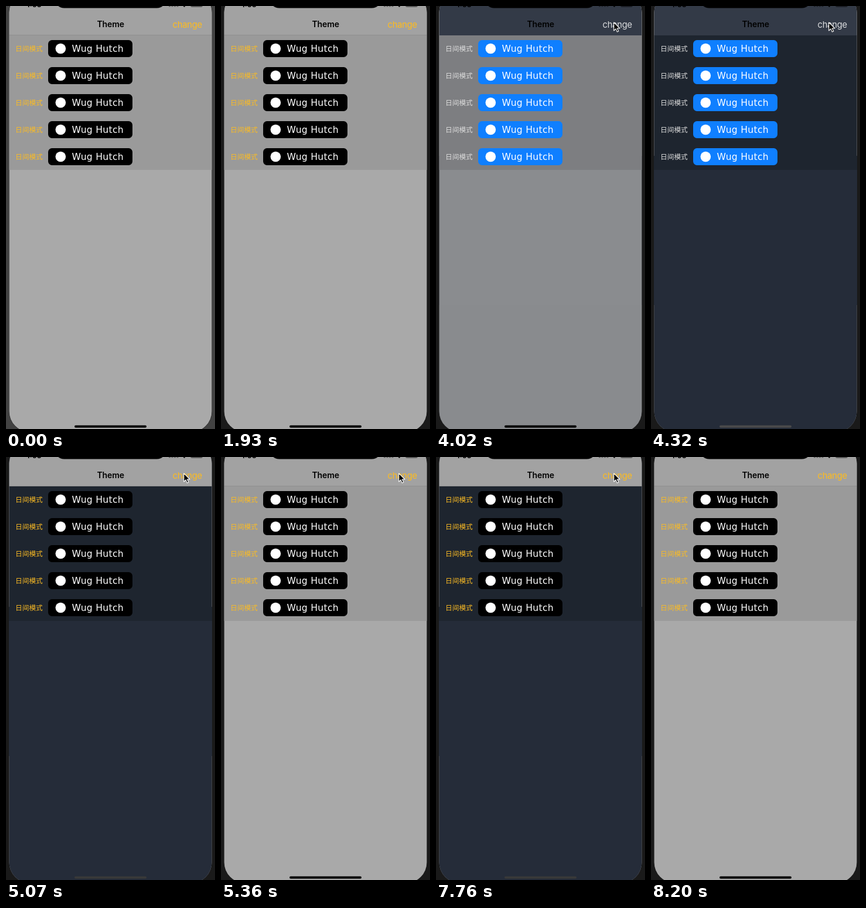
These frames come from a looping animation (357 px wide and 720 px high, 8900 ms). An HTML page:

```html
<!DOCTYPE html>
<html lang="en">
<head>
<meta charset="utf-8">
<title>Theme switch</title>
<style>
  html, body { margin: 0; width: 100%; height: 100%; overflow: hidden; background: #191919; }
  svg { display: block; width: 357px; height: 720px; }
  text { font-family: Inter, sans-serif; }
  .title { font-size: 14px; font-weight: 600; letter-spacing: -.1px; text-anchor: middle; }
  .action { font-size: 14.8px; letter-spacing: -.25px; text-anchor: end; }
  .time { font-size: 13px; font-weight: 600; }
  #labels text { font: 11.7px "Noto Sans CJK SC", "Noto Sans CJK", sans-serif; }
  #names text { font: 15.6px "DejaVu Sans", sans-serif; letter-spacing: .3px; }
</style>
</head>
<body>
<svg viewBox="0 0 357 720">
  <defs>
    <clipPath id="screen"><rect x="5.5" y="-24" width="346" height="749" rx="35"/></clipPath>
  </defs>
  <rect id="bezel" width="357" height="720"/>
  <rect x="5" y="-24.5" width="347" height="750" rx="35.5" fill="#111"/>

  <g clip-path="url(#screen)">
    <rect width="357" height="720" fill="#a9a9a9"/>
    <rect y="50" width="357" height="229" fill="#9a9a9a"/>
    <g id="nightBody">
      <rect width="357" height="720" fill="#252c39"/>
      <rect y="50" width="357" height="229" fill="#1e252f"/>
    </g>
    <rect width="357" height="50" fill="#a2a2a2"/>
    <rect y="49" width="357" height="1" fill="#8e8e8e"/>
    <rect id="nightBar" width="357" height="50" fill="#333a47"/>

    <rect x="82.5" y="-30" width="192" height="33.5" rx="17"/>
    <text class="time" x="35" y="1.5">1:53</text>
    <g fill="#000" fill-opacity=".45">
      <path d="M278 0h3v1.3h-3zm4.5 0h3v1.3h-3zm4.5 0h3v1.3h-3zm4.5 0h3v1.3h-3z"/>
      <rect x="315" y="-8" width="21" height="10" rx="3"/>
    </g>
    <path d="M301.5 -1h6l-3 3z"/>

    <text class="title" x="178.7" y="36">Theme</text>
    <text class="action" id="action" x="335" y="36.5">change</text>

    <g id="labels"></g>
    <g id="buttons"></g>
    <g id="names" fill="#fff"></g>
    <rect id="home" x="117" y="713.7" width="123" height="4" rx="2"/>
  </g>

  <g id="cursor">
    <path d="M.8 .9V15l3.3-3.1 2.3 5.2 2.4-1-2.3-5.1H11z" stroke="#fff" stroke-width="1.1" stroke-linejoin="round"/>
  </g>
</svg>

<script>
const LOOP = 8900;
const byId = id => document.getElementById(id);

function add(parent, tag, attrs, content = '') {
  const node = document.createElementNS('http://www.w3.org/2000/svg', tag);
  for (const key in attrs) node.setAttribute(key, attrs[key]);
  node.textContent = content;
  byId(parent).append(node);
}

for (let row = 0; row < 5; row++) {
  const y = row * 46;
  add('labels', 'text', { x: 16, y: y + 76.6 }, '日间模式');
  add('buttons', 'rect', { x: 72, y: y + 58, width: 144, height: 29, rx: 6.5 });
  add('names', 'circle', { cx: 93.3, cy: y + 72.5, r: 8.8 });
  add('names', 'text', { x: 112.5, y: y + 78.2 }, 'Wug Hutch');
}

// Each step is [start in ms, value]; a value holds until the next step.
function play(id, property, steps) {
  const frames = steps.map(([ms, value]) => ({ offset: ms / LOOP, [property]: value, easing: 'step-end' }));
  frames.push({ offset: 1, [property]: steps.at(-1)[1] });
  byId(id).animate(frames, { duration: LOOP, iterations: Infinity });
}

const themed = (day, night) =>
  [[0, day], [4020, night], [5070, day], [7010, night], [7760, day]];

play('bezel', 'fill', [[0, '#424242'], [1930, '#1a1a1a']]);
play('nightBar', 'opacity', themed(0, 1));
play('action', 'fill', themed('#ffbc1c', '#dcdddf'));
play('labels', 'fill', themed('#fabb24', '#dcdcdc'));
play('buttons', 'fill', themed('#000', '#0f7fff'));

play('nightBody', 'opacity', [
  [0, 0], [4020, .235], [4170, 1], [5210, .4], [5360, 0],
  [7010, .33], [7160, 1], [7910, .1], [8060, 0]
]);

play('home', 'fill', [
  [0, '#000'], [4170, '#2b2b2b'], [4320, '#4a4a4b'], [5070, '#393939'], [5210, '#000'],
  [7160, '#2b2b2b'], [7310, '#4a4a4b'], [7760, '#393939'], [7910, '#000']
]);

const hidden = [-50, -50];
const cursorPath = [
  [0, hidden], [150, [351, 117]], [290, [351, 124]], [440, [333, 124]],
  [740, [319, 123]], [890, [308, 87]], [1030, [309, 80]], [1180, [313, 3]],
  [1330, hidden], [3430, [305, -8]], [3580, [302, 21]], [3720, [303, 27]],
  [7910, [318, 250]], [8060, [320, 517]], [8200, hidden]
];
play('cursor', 'transform', cursorPath.map(([ms, [x, y]]) => [ms, `translate(${x}px, ${y}px)`]));
</script>
</body>
</html>
```
